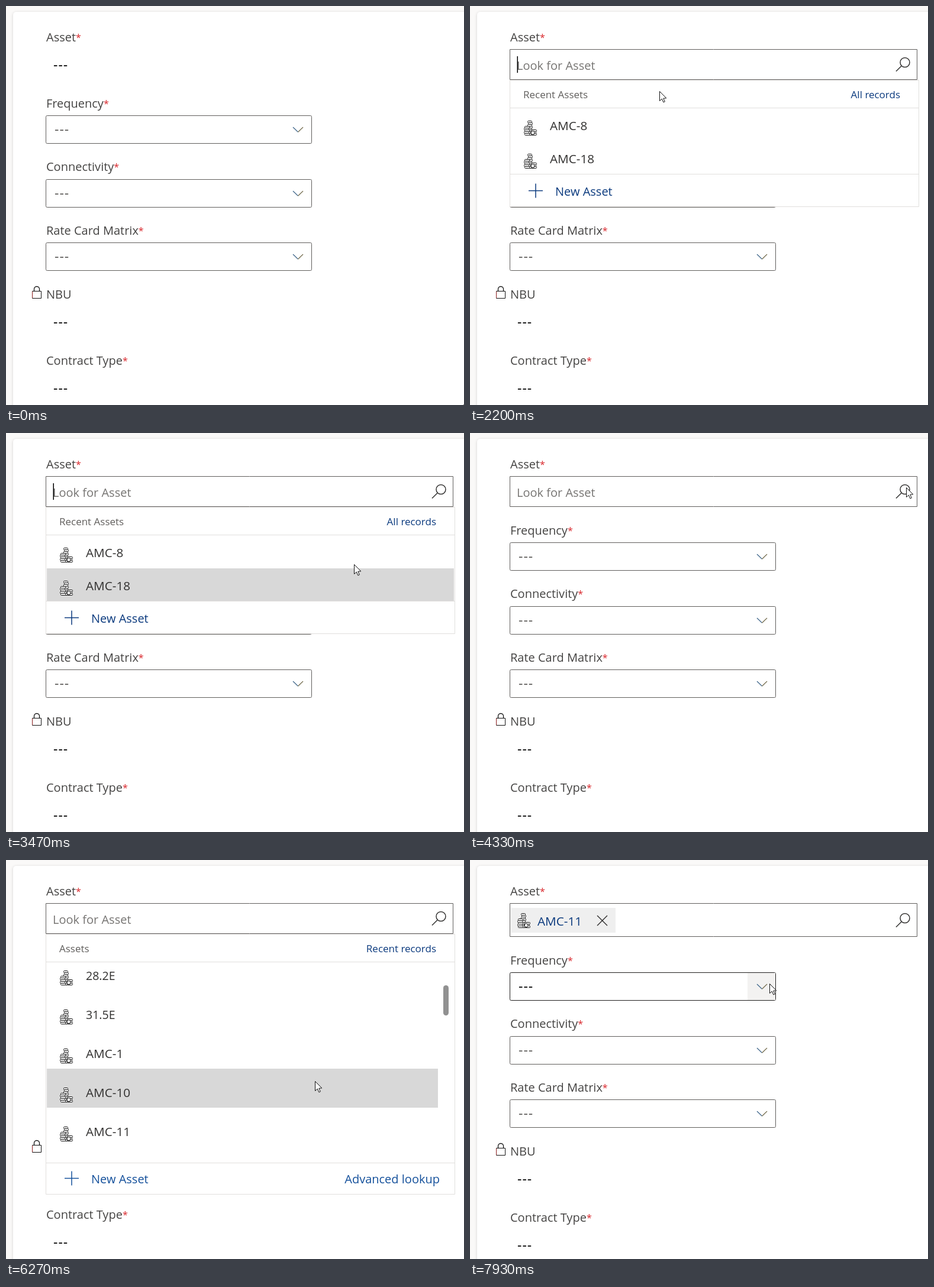
These frames come from a looping animation (774 px wide and 675 px high, 8000 ms). An HTML page with a canvas:

```html
<!DOCTYPE html>
<html lang="en">
<head>
<meta charset="utf-8">
<title>Asset lookup</title>
<style>
html, body { margin: 0; width: 100%; height: 100%; overflow: hidden; background: #faf9f8; }
canvas { display: block; }
</style>
</head>
<body>
<canvas id="stage" width="774" height="675"></canvas>
<script>
const ctx = document.getElementById('stage').getContext('2d');
const LOOP = 8000, STEP = 200 / 3;
const INK = '#323130', LABEL = '#444342', GREY = '#605e5c', NAVY = '#0b3a7e', BLUE = '#14509b', HOVER = '#d8d8d8';

// Moments of the interaction, in ms
const FOCUS = 1070, RECENT = 1270, CLOSE = 4270, REOPEN = 4400, ALL = 4600, ICONS = 4870, PICK = 7000;
const BLINK = 530;

const recentAssets = ['AMC-8', 'AMC-18'];
const allAssets = ['19.2E', '23.5E', '28.2E', '31.5E', 'AMC-1', 'AMC-10', 'AMC-11', 'AMC-14'];

// Pointer path: time, x, y
const path = [
  [0, 773, 674], [70, 773, 674], [330, 570, 330], [530, 360, 63], [670, 311, 99], [800, 311, 99],
  [870, 309, 98], [1870, 309, 98], [2200, 320, 144], [2400, 322, 154], [2740, 322, 154],
  [3000, 430, 262], [3270, 560, 314], [3470, 588, 222], [3730, 655, 150], [4000, 700, 138],
  [4270, 737, 92], [4800, 737, 92], [5130, 650, 215], [5470, 549, 321], [5670, 537, 338],
  [6000, 537, 338], [6270, 522, 374], [6600, 506, 447], [7130, 506, 447], [7470, 503, 300],
  [7730, 507, 209], [7870, 507, 209], [7930, 506, 209], [8000, 506, 209]
];

function pointerAt(t) {
  t = Math.max(0, t);
  const i = Math.max(1, path.findIndex(p => p[0] >= t));
  const [t0, x0, y0] = path[i - 1], [t1, x1, y1] = path[i];
  const k = (t - t0) / (t1 - t0);
  return { x: Math.round(x0 + (x1 - x0) * k), y: Math.round(y0 + (y1 - y0) * k) };
}

const inside = (p, x, y, w, h) => p.x >= x && p.x < x + w && p.y >= y && p.y < y + h;

function text(s, x, y, color = INK, size = 20, align = 'left') {
  ctx.font = `${size}px "Open Sans", "Noto Sans", sans-serif`;
  ctx.fillStyle = color;
  ctx.textAlign = align;
  ctx.fillText(s, x, y);
}

function dashes(x, y, color) {
  ctx.letterSpacing = '1px';
  text('---', x, y + 6, color, 23);
  ctx.letterSpacing = '0px';
}

function label(s, y, required = true) {
  text(s, 68, y, LABEL);
  if (required) text('*', 68 + ctx.measureText(s).width, y - 1, '#d9282d', 16);
}

function fill(x, y, w, h, color) {
  ctx.fillStyle = color;
  ctx.fillRect(x, y, w, h);
}

function frame(x, y, w, h, color, r = 0) {
  ctx.beginPath();
  ctx.roundRect(x + .5, y + .5, w - 1, h - 1, r);
  ctx.fillStyle = '#fff';
  ctx.fill();
  ctx.strokeStyle = color;
  ctx.lineWidth = 1;
  ctx.stroke();
}

function line(points, color, width = 1) {
  ctx.beginPath();
  points.forEach(p => ctx.lineTo(...p));
  ctx.strokeStyle = color;
  ctx.lineWidth = width;
  ctx.stroke();
}

function select(y, mouse) {
  const hot = mouse && inside(mouse, 67, y, 450, 48);
  frame(67, y, 450, 48, hot ? '#201f1e' : GREY, 2);
  if (hot) fill(469, y + 1, 47, 46, '#f3f2f1');
  dashes(82, y + 26, hot ? '#000' : GREY);
  line([[485, y + 20], [493.5, y + 28.3]], '#3f668a', 1.2);
  line([[493.5, y + 28.3], [502, y + 20]], '#736b4c', 1.2);
}

function lock(y) {
  ctx.beginPath();
  ctx.moveTo(47.5, y + 8);
  ctx.lineTo(47.5, y + 5);
  ctx.arc(52, y + 5, 4.5, Math.PI, 0);
  ctx.lineTo(56.5, y + 8);
  ctx.strokeStyle = '#111';
  ctx.lineWidth = 1.3;
  ctx.stroke();
  frame(44, y + 8, 16, 13, '#111');
  line([[44.5, y + 9], [44.5, y + 20]], '#8c1d1d');
}

function magnifier(y) {
  ctx.beginPath();
  ctx.arc(735, y, 8, 0, Math.PI * 2);
  ctx.strokeStyle = INK;
  ctx.lineWidth = 1.5;
  ctx.stroke();
  line([[729.3, y + 5.7], [720, y + 15]], INK, 1.5);
}

function coins(x, y) {
  const stack = (sx, top, w) => {
    for (let cy = 21; cy >= top; cy -= 3) frame(x + sx + (cy / 3 % 2), y + cy, w, 4, '#111', 1);
  };
  stack(6, 0, 8);
  stack(0, 9, 9);
  stack(11, 15, 10);
  ctx.beginPath();
  ctx.arc(x + 15, y + 20.5, 3, 0, Math.PI * 2);
  ctx.fillStyle = '#fff';
  ctx.fill();
  ctx.stroke();
}

function assetRow(name, base, icon = true) {
  if (icon) coins(91, base - 16);
  text(name, 135, base, INK, name.startsWith('A') ? 20.7 : 19.5);
}

function popup(height, title, link, footColor) {
  const foot = 125 + height;
  frame(67, 125, 692, height, '#e1dfdd');
  fill(68, 172, 690, 1, '#e1dfdd');
  fill(68, foot - 56 + (height > 300 ? 2 : 0), 690, 1, '#e1dfdd');
  text(title, 90, 156, GREY, 17);
  text(link, 727, 156, NAVY, 17, 'right');
  const cy = foot - 27.5;
  line([[99, cy], [123, cy]], footColor, 1.5);
  line([[111, cy - 12], [111, cy + 12]], footColor, 1.5);
  text('New Asset', 144, foot - 19, footColor);
}

function recentPopup(mouse) {
  popup(215, 'Recent Assets', 'All records', NAVY);
  recentAssets.forEach((name, i) => {
    const y = 173 + i * 56;
    if (inside(mouse, 69, y, 688, 56)) fill(69, y, 688, i ? 55 : 56, HOVER);
    assetRow(name, y + 37);
  });
}

function allPopup(t, mouse) {
  const scroll = t < 5730 ? 0 : t < 5800 ? 90 : 150;
  popup(441, 'Assets', 'Recent records', BLUE);
  text('Advanced lookup', 733, 547, BLUE, 20, 'right');
  ctx.save();
  ctx.beginPath();
  ctx.rect(68, 173, 690, 338);
  ctx.clip();
  allAssets.forEach((name, i) => {
    const y = 173 + i * 66 - scroll;
    if (inside(mouse, 69, y, 661, 66) && mouse.y >= 173) fill(69, y, 661, 66, HOVER);
    assetRow(name, y + 48, t >= ICONS);
  });
  ctx.restore();
  ctx.beginPath();
  ctx.roundRect(739, 182 + scroll / 5, 9, 51, 4.5);
  ctx.fillStyle = '#919191';
  ctx.fill();
}

function caretOn(t) {
  const start = t >= REOPEN ? REOPEN : FOCUS;
  const focused = t >= FOCUS && t < PICK && !(t >= CLOSE && t < REOPEN);
  return focused && Math.floor((t - start) / BLINK) % 2 === 0;
}

function assetField(t, mouse) {
  if (t >= PICK) {
    frame(67, 73, 689, 57, GREY);
    fill(69, 81, 177, 42, '#efefef');
    coins(80, 90);
    text('AMC-11', 114, 111, NAVY, 20.7);
    line([[215, 94], [232, 111]], INK, 1.5);
    line([[232, 94], [215, 111]], INK, 1.5);
    magnifier(98.5);
  } else if (t >= FOCUS || inside(mouse, 67, 73, 689, 52)) {
    frame(67, 73, 689, 52, GREY);
    text('Look for Asset', 79, 108, '#767472');
    magnifier(95.5);
    if (caretOn(t)) fill(79.5, 85, 1.5, 28, '#000');
  } else {
    dashes(80, 102, '#000');
  }
}

function pointer({ x, y }) {
  ctx.beginPath();
  [[0, 0], [0, 16], [3.8, 12.6], [6.4, 18.4], [8.8, 17.3], [6.3, 11.7], [11.3, 11.4]]
    .forEach(([dx, dy]) => ctx.lineTo(x + .5 + dx, y + .5 + dy));
  ctx.closePath();
  ctx.fillStyle = '#fff';
  ctx.fill();
  ctx.strokeStyle = '#111';
  ctx.lineWidth = 1;
  ctx.stroke();
}

function card() {
  fill(0, 0, 774, 675, '#faf9f8');
  ctx.save();
  ctx.shadowColor = 'rgba(0,0,0,.16)';
  ctx.shadowBlur = 5;
  ctx.shadowOffsetY = 1;
  ctx.fillStyle = '#fff';
  ctx.beginPath();
  ctx.roundRect(12, 10, 800, 700, 5);
  ctx.fill();
  ctx.restore();
}

function draw(t) {
  const mouse = pointerAt(t - 60); // hover trails the pointer slightly
  const recent = (t >= RECENT && t < CLOSE) || (t >= REOPEN && t < ALL);
  const all = t >= ALL && t < PICK;
  const dy = t >= PICK ? 5 : 0;

  card();
  label('Asset', 60);
  assetField(t, mouse);
  label('Frequency', 172 + dy);
  label('Connectivity', 279 + dy);
  label('Rate Card Matrix', 387 + dy);
  [185, 293, 400].forEach(y => select(y + dy, recent || all ? null : mouse));
  lock(474 + dy);
  label('NBU', 495 + dy, false);
  dashes(80, 537 + dy, '#000');
  label('Contract Type', 607 + dy);
  dashes(80, 649 + dy, '#000');
  if (recent) recentPopup(mouse);
  if (all) allPopup(t, mouse);
  pointer(pointerAt(t));
}

function tick() {
  const t = performance.now() % LOOP;
  // The screen refreshes 15 times a second
  draw(Math.round(Math.floor((t + 4) / STEP) * STEP / 10) * 10 % LOOP);
  requestAnimationFrame(tick);
}
tick();
</script>
</body>
</html>
```
